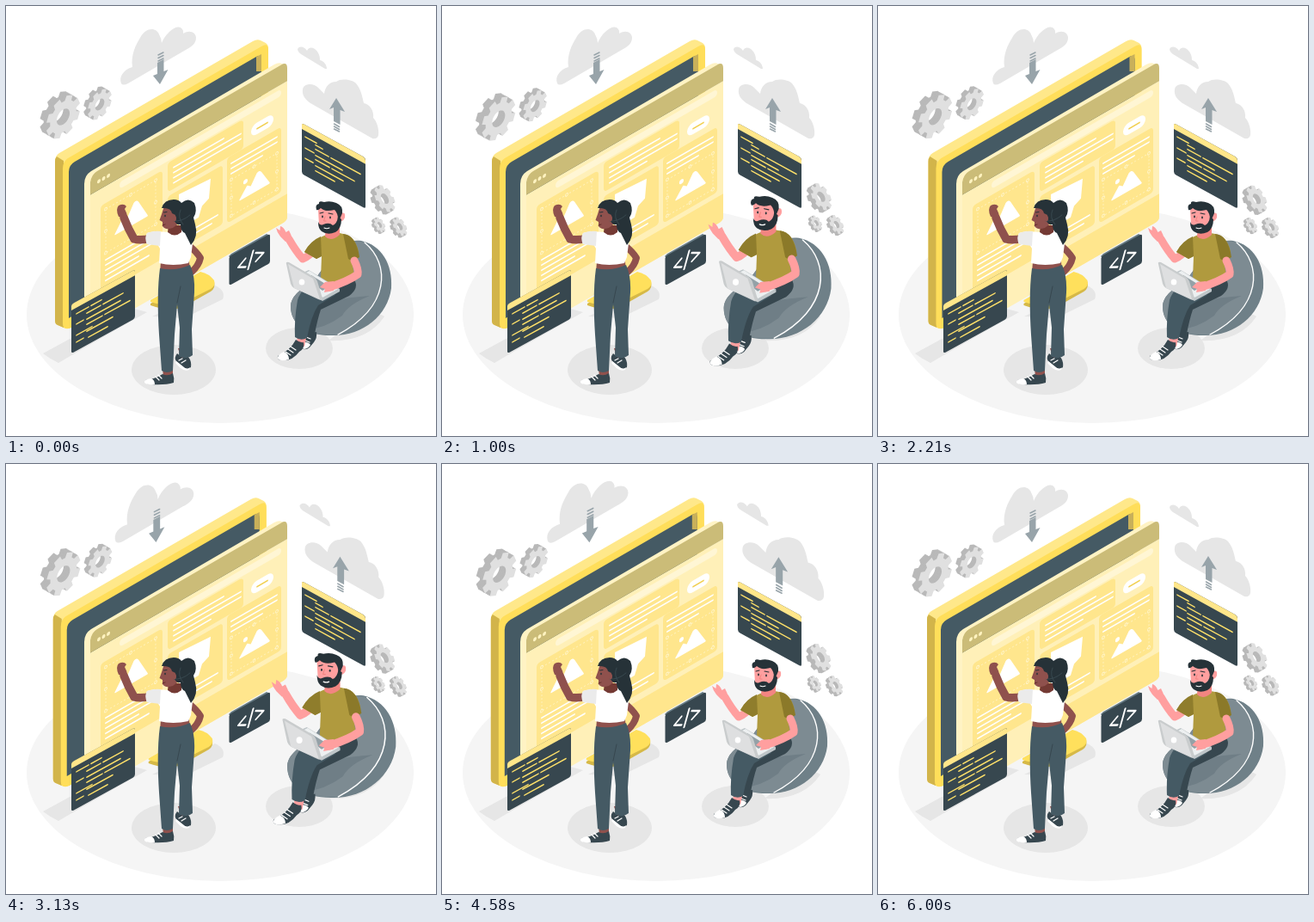
An HTML page for the animation above (6.04 s loop, 500 px wide and 500 px high).

```html
<!DOCTYPE html>
<html lang="en">
<head>
<meta charset="utf-8">
<title>Web design team</title>
<style>
html, body { margin: 0; width: 100%; height: 100%; overflow: hidden; background: #fff; }
svg { display: block; width: 100vw; height: 100vh; }
</style>
</head>
<body>
<svg id="stage" viewBox="0 0 500 500"></svg>
<script>
const dark = '#455a64', ink = '#263238', navy = '#37474f', gold = '#ffe169';
const brown = '#8f514d', pink = '#ff9f9f', grey = '#e6e6e6';

const path = (d, fill, extra = '') => `<path d="${d}" fill="${fill}" ${extra}/>`;
const line = (d, color, width, extra = '') =>
  `<path d="${d}" fill="none" stroke="${color}" stroke-width="${width}" stroke-linecap="round" stroke-linejoin="round" ${extra}/>`;
const oval = (x, y, rx, ry, fill, extra = '') =>
  `<ellipse cx="${x}" cy="${y}" rx="${rx}" ry="${ry}" fill="${fill}" ${extra}/>`;
const box = (x, y, w, h, r, fill, extra = '') =>
  `<rect x="${x}" y="${y}" width="${w}" height="${h}" rx="${r}" fill="${fill}" ${extra}/>`;
const group = (content, attrs = '') => `<g ${attrs}>${content}</g>`;
// A vertical isometric plane whose x axis climbs or falls by the given slope
const plane = (x, y, slope, content) => group(content, `transform="matrix(1 ${slope} 0 1 ${x} ${y})"`);

function gear(cx, cy, r, depth, tilt) {
  const at = (a, k) => `${(r * k * Math.cos(a)).toFixed(2)} ${(r * k * Math.sin(a)).toFixed(2)}`;
  const rim = [], hole = [];
  for (let i = 0; i < 8; i++) {
    const a = (i + .5) * Math.PI / 4;
    rim.push(at(a - .27, .77), at(a - .19, 1), at(a + .19, 1), at(a + .27, .77));
  }
  for (let i = 0; i < 24; i++) hole.push(at(i * Math.PI / 12, .38));
  const d = `M${rim.join('L')}ZM${hole.join('L')}Z`;
  let out = '';
  for (let i = 8; i >= 0; i--) {
    const x = cx - depth * i / 8, y = cy - depth * .57 * tilt * i / 8;
    out += path(d, i ? '#b9b9b9' : '#e0e0e0',
      `fill-rule="evenodd" transform="matrix(.866 ${-.5 * tilt} 0 1 ${x} ${y})"`);
  }
  return out;
}

function clouds() {
  const arrow = '#98a4aa';
  return path('M134 90C131 82 137 74 147 71C145 57 151 45 156 37C163 24 175 25 178 33Q181 38 181 43C186 31 197 22 203 25Q207 28 206 32C214 27 221 31 221 37C221 44 215 48 209 51L142 90Q136 93 134 90Z', grey)
    + path('M345 97C346 90 357 89 363 95L370 102C371 94 376 88 384 88C389 84 402 85 407 90C413 97 414 105 416 113C423 114 428 122 427 130C431 134 434 143 433 150Q432 155 426 154L354 113C347 108 344 103 345 97Z', grey)
    + path('M339 50C341 46 347 47 350 52C353 46 359 49 362 53Q365 57 365 63C370 64 373 69 373 73H371L343 56Q339 53 339 50Z', grey)
    + path('M176 66L183.500 62V76L188.500 74L179 91L171 81L176 79Z', arrow)
    + line('M177 57L183 54M177 60.5L183 57.5M177 64L183 61', arrow, 1.5)
    + path('M384 107L394 123L388.500 121V138L381 134V118L376 120Z', arrow)
    + line('M381.5 137L387.500 140.500M381.5 140L387.500 143.500M381.5 143L387.500 146', arrow, 1.5);
}

function monitor() {
  return path('M168 346L226 313Q236 314 242 321Q244 328 238 332L206 350Q190 356 168 348Z', '#d6b947')
    + path('M168 342L226 309Q236 311 242 319Q244 325 238 329L206 345Q190 351 168 344Z', '#ffe05c')
    + path('M57 181Q57 174 62 171L287 41Q292 38 296 40L302 43Q305 45 305 49V240L75 374Q71 376 67 374L60 371Q57 370 57 366Z', '#ffe88a')
    + path('M57 181Q57 177 59 175L67 180V374L60 371Q57 370 57 366Z', '#d2b44a')
    + path('M66 189Q66 181 72 177L297 47Q305 42 305 51V240L76 374Q66 378 66 369Z', '#ffde5a')
    + path('M73 193Q73 185 80 181L291 59Q297 56 297 63V232L73 363Z', dark)
    + path('M291 59L297 56V76H291Z', '#c8b05a');
}

function picture(x, y, w, h) {
  const px = k => x + w * k, py = k => y + h * k;
  let out = box(x, y, w, h, 0, 'none', 'stroke="#fff3c4" stroke-width=".8" stroke-dasharray="2 2"');
  for (const i of [0, .5, 1]) for (const j of [0, .5, 1])
    if (i !== .5 || j !== .5) out += oval(px(i), py(j), 1.4, 1.6, '#ffe68a', 'stroke="#fff7d6" stroke-width=".8"');
  const hill = `M${px(.19)} ${py(.7)}L${px(.35)} ${py(.44)}L${px(.43)} ${py(.52)}L${px(.57)} ${py(.24)}Q${px(.61)} ${py(.2)} ${px(.65)} ${py(.28)}L${px(.83)} ${py(.7)}Z`;
  return out + path(hill, '#fff', 'stroke="#fff" stroke-width="1.5" stroke-linejoin="round"')
    + oval(px(.31), py(.28), 2.6, 2.6, '#fff');
}

function browser() {
  const card = '#ffe68d', rule = d => line(d, '#fff', 1.8);
  const page = path('M0 0H229V158Q229 162 225 162H0Z', '#fff0b8')
    + path('M0 0V-14Q1 -23 8 -23H222Q229 -23 229 -15V0Z', '#cbbc78')
    + [10, 15.5, 21].map(x => oval(x, -10, 2, 2.2, '#fff3c0')).join('')
    + box(34, 5, 188, 8, 4, '#fff6d4')
    + box(12, 20, 72, 103, 4, card)
    + box(90, 15, 88, 34, 4, card)
    + box(90, 54, 64, 69, 4, card)
    + box(159, 49, 63, 76, 4, card)
    + path('M90 131H229V158Q229 162 225 162H90Z', card)
    + picture(18, 27, 58, 51)
    + rule('M18 86H74M18 92H66M18 98H74M18 104H56M18 110H68')
    + rule('M97 24H155M97 30H175M97 36H175M97 42H140')
    + path('M103 59L140 62L138 84L130 88L126 99L103 100Z', '#fff')
    + rule('M97 109H148M97 115H141')
    + rule('M164 58H217M164 64H217M164 70H200')
    + picture(164, 77, 53, 42)
    + box(187, 28, 26, 13.5, 6.5, '#fff') + line('M194 35H206', '#f1cf50', 1.7);
  return path('M91 207Q91 197 99 192L312 68Q317 65 321 67L326 70L98 205V384L91 380Z', '#fff3c4')
    + plane(98, 219.5, -.577, page);
}

function codeWindow(x, y, slope, w, h, rows) {
  const body = box(0, 0, w, h, 2.5, navy)
    + path(`M0 7V2Q0 0 3 0H${w - 3}Q${w} 0 ${w} 3V7Z`, '#ffe68a')
    + rows.map(([a, b, v]) => line(`M${a} ${v}H${b}`, gold, 1.6)).join('');
  return plane(x, y, slope, body);
}

function codeWindows() {
  return codeWindow(76, 347, -.55, 74, 57, [[6, 20, 14], [23, 35, 14], [18, 34, 20], [37, 60, 20], [6, 14, 26],
      [18, 57, 27], [18, 36, 33], [39, 68, 33], [6, 24, 39], [18, 48, 41], [6, 14, 47], [20, 42, 49]])
    + codeWindow(344, 136, .55, 74, 59, [[4, 17, 14], [16, 24, 17], [16, 31, 22], [34, 68, 22], [4, 14, 27],
      [16, 47, 29], [16, 32, 34], [35, 61, 34], [4, 13, 39], [16, 48, 41], [16, 38, 47]])
    + path('M259 291L262 288L303 265L307 267L262 294Z', '#667b84')
    + plane(259.5, 291, -.55, box(0, 0, 47.5, 34, 2.5, navy)
      + line('M19 13L10.500 18.500L19 23M28 9L22 27M31 13L40 18L31 23', '#fff', 2.2));
}

function shoe(x, y, d, toe, laces) {
  return group(path(d, navy) + path(toe, '#fff') + line(laces, '#fff', 1.2), `transform="translate(${x} ${y})"`);
}

function woman() {
  return path('M200 398H212V410L204 411Z', brown)
    + shoe(195, 403, 'M4 1L10 6L17 5Q21 10 20 17Q17 20 13 18L3 10Q0 6 4 1Z', 'M3 10L13 18Q17 20 19 17L18 20Q13 22 8 18L2 12Z', 'M6 9L10 7M9 12L14 9')
    + path('M182 420H194V431L183 432Z', brown)
    + shoe(160, 424, 'M22 4Q28 7 34 3Q36 9 35 14Q25 17 9 16Q1 16 2 11Q13 10 22 4Z', 'M9 9Q0 10 1 14Q4 17 13 16Q13 11 9 9Z', 'M14 7L18 11M17 5L21 9')
    + line('M212 278Q222 286 226 293Q224 302 216 309', brown, 8)
    + line('M169 270Q157 273 149 271Q142 259 137 246', brown, 9.5)
    + path('M131 245Q127 236 131 232Q137 229 140 233L138 236Q141 241 141 246Z', brown)
    + path('M180 297H213L214 310H179Z', brown)
    + path('M179 305Q197 309 214 301Q220 314 219 333L216 376L217 406Q210 412 201 407L202 374L199 347L196 382L194 424Q187 428 181 424L178 382Q175 335 179 305Z', dark)
    + line('M199 345L203 326', navy, 1)
    + path('M164 264Q172 261 188 263L205 260Q213 266 217 276L215 292L212 299Q194 303 178 299L179 282L176 277L164 277Q161 270 164 264Z', '#fff')
    + path('M164 264Q172 261 180 262L179 279L164 277Q161 270 164 264Z', '#ebebeb')
    + path('M189 255H204V263Q196 270 188 263Z', '#743a34')
    + path('M184 232L181 242L178.500 249L182 251V256Q185 261 194 258L203 251V231Q191 224 184 232Z', brown)
    + path('M181 235Q184 225 195 225Q201 225 204 229Q212 222 219 229Q223 239 218 246L220 254Q224 268 215 278Q211 270 208 264Q203 262 203 254Q198 255 196 250L197 243L193 241Q192 234 181 235Z', ink)
    + line('M195 250Q205 251 214 243M203 237Q199 246 206 254', '#40525a', .7)
    + oval(196, 247, 2, 3.2, brown) + oval(185, 244, .8, 1.2, ink)
    + line('M183.500 240L187 239.500', ink, 1) + line('M182 255L185 254', '#5b2925', .8);
}

function man() {
  return path('M413 273C437 278 450 301 448 328C444 360 415 383 381 383C350 384 331 371 331 349C332 333 350 327 362 314C383 286 392 270 413 273Z', '#6f8088')
    + path('M416 275C447 300 447 350 386 382C350 384 331 371 331 349C332 333 350 327 362 314C383 286 392 268 416 275Z', '#7d8b92')
    + line('M417 275C447 300 447 350 386 382', '#fff', 1.4)
    + path('M352 352Q377 340 423 337Q398 347 391 360Q371 375 350 376Z', '#6f7e86')
    + path('M347 375L357 378L351 390L342 386Z', pink)
    + shoe(340, 373, 'M11 2Q16 7 21 6Q22 13 18 18L13 24Q8 28 4 25L5 18Q11 12 11 2Z', 'M5 18Q2 25 7 26Q12 25 14 21Q11 17 5 18Z', 'M9 12L14 14M8 16L13 18')
    + path('M339 382L349 386L347 396L338 393Z', pink)
    + path('M367 322L405 318Q411 328 399 337L366 353Q362 365 359 381Q353 384 347 380L349 351Z', navy)
    + path('M364 316L383 336L363 348Q355 360 350 386Q343 390 336 385Q335 365 339 342Q343 328 364 316Z', dark)
    + shoe(315, 386, 'M22 2Q27 6 31 5Q33 12 26 16Q18 27 6 26Q0 26 1 21Q16 14 22 2Z', 'M8 16Q0 20 1 24Q4 28 14 25Q14 18 8 16Z', 'M16 10L22 14M13 13L19 17M10 16L16 20')
    + line('M359 282Q353 291 345 294Q337 285 329 271', pink, 9)
    + path('M325 274L319 268Q315 263 314 258L318.500 261L319 256Q323 257 325.500 263L329 261Q332 266 333 272Z', pink)
    + path('M370 267Q381 262 392 265Q406 267 410 286L409 293L402 296L406 319Q386 329 366 317L367 291L361 294L347 286Q354 273 370 267Z', '#b09a3e')
    + path('M392 265Q407 266 411 292Q403 298 398 294Z', '#8b7929')
    + path('M366 268L367 291L361 294L347 286Q354 273 366 268Z', '#8f7d2c')
    + path('M372 257L388 254V266Q378 275 371 268Z', '#f28581')
    + path('M363 237Q363 231 377 231Q390 231 390 241Q395 239 394 246Q392 251 388 250Q387 261 378 264Q367 264 364 255Z', pink)
    + path('M363 251Q365 256 369 254Q376 251 380 255Q385 253 386 245L390 248Q390 259 383 263Q374 267 367 262Q363 259 363 251Z', ink)
    + path('M361 237Q359 231 364 230Q363 226 370 228Q377 226 384 229Q392 232 391 241L388 248H386Q386 241 382 237Q371 240 366 235Q363 238 361 237Z', ink)
    + oval(368, 245, .9, 1.4, ink) + oval(377, 246, .9, 1.4, ink)
    + line('M365 241L369 240M375 241L380 242', ink, 1.1)
    + line('M371 245L369.500 250H372', '#ef7d79', .8) + line('M370 258Q373 259.500 376 258', '#fff', 1.1)
    + path('M343 311L352 307L388 329V332L368 343L344 330Z', '#bfc6c9')
    + path('M347 311L353 308L386 329L368 339Z', '#edf0f1') + path('M355 313L376 326L368 331L352 319Z', '#94a1a7')
    + line('M405 296Q410 306 409 312Q398 320 376 327', pink, 9)
    + path('M381 320L371 321L365 327L371 329L370 333L381 331Z', pink)
    + path('M326 300Q325 297 329 298L358 315Q361 317 362 320L368 340Q367 343 363 341L335 328Q332 326 331 323Z', '#c9cccd')
    + path('M328 300L357 317L365 341L335 328Z', '#dedfe0')
    + oval(344, 321, 3.3, 3.6, '#fff');
}

const shadows = oval(249, 359, 225, 126, '#f5f5f5')
  + path('M43 404L142 350L164 356L78 405L61 415Q52 411 43 404Z', '#e6e6e6')
  + path('M170 361L243 325Q256 331 252 341L207 363Z', '#e6e6e6')
  + oval(195, 423, 49, 29, '#e6e6e6')
  + oval(341, 398, 39, 24, '#e6e6e6')
  + path('M375 389Q420 391 440 361Q433 355 412 361Z', '#e6e6e6');

document.getElementById('stage').innerHTML = shadows
  + group(clouds(), 'id="clouds"')
  + group(gear(66.5, 129, 23, 7.5, 1) + gear(109, 114.5, 16.3, 5, 1)
    + gear(440.5, 224, 14.2, 5, -1) + gear(434.5, 254.5, 8, 2.8, -1) + gear(458, 256.5, 10, 3.4, -1), 'id="gears"')
  + group(monitor(), 'id="monitor"')
  + browser() + codeWindows() + woman()
  + group(man(), 'id="man"');

// Linear interpolation through [position, value] stops
function tween(stops, p) {
  const i = Math.max(1, stops.findIndex(s => s[0] >= p));
  const [a, u] = stops[i - 1], [b, v] = stops[i];
  return u + (v - u) * (p - a) / (b - a);
}
const beat = [[0, 1], [.1, 1.1], [.3, 1], [.4, 1], [.5, 1.1], [.6, 1], [1, 1]];
const shake = [[0, 0], [.1, -1], [.2, 2], [.3, -4], [.4, 4], [.5, -4], [.6, 4], [.7, -4], [.8, 2], [.9, -1], [1, 0]];
const sway = [[0, 0], [.25, 1], [.75, -1], [1, 0]];

const move = (id, value) => document.getElementById(id).setAttribute('transform', value);
const zoom = (s, x, y) => `translate(${x} ${y}) scale(${s}) translate(${-x} ${-y})`;

const start = performance.now();
function draw(now) {
  const t = Math.min(6000, Math.max(0, now - start) % 6040);
  const phase = ms => t % ms / ms;
  move('man', zoom(tween(beat, phase(6000)), 381, 320));
  move('clouds', zoom(tween(beat, phase(3000)), 283, 89));
  move('monitor', `translate(${tween(shake, phase(6000))} 0)`);
  move('gears', `rotate(${tween(sway, phase(1500))} 254 185)`);
  requestAnimationFrame(draw);
}
draw(start);
</script>
</body>
</html>
```
